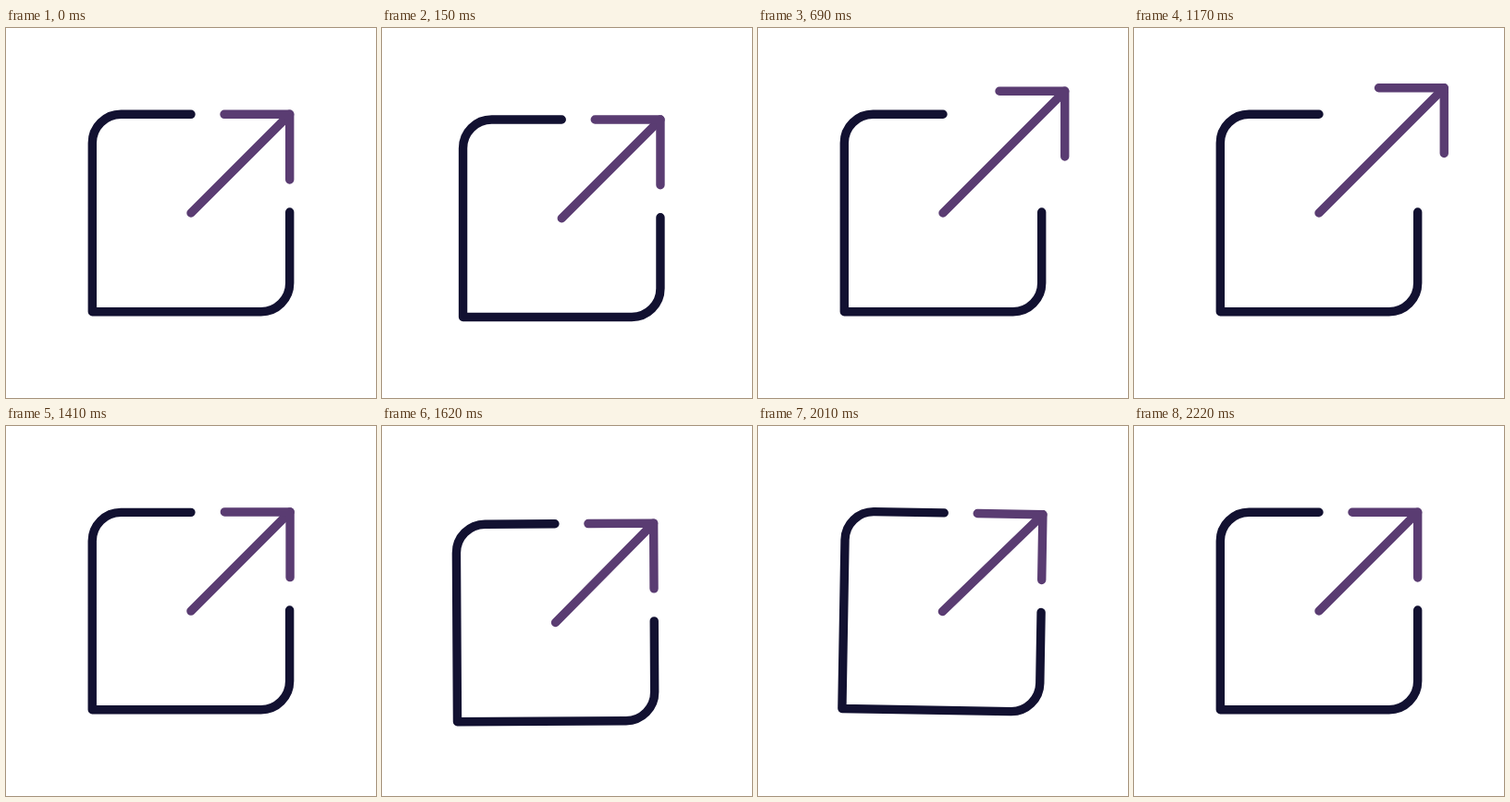
Write an HTML page that moves like this. It is 400 by 400 pixels and loops after 2340 ms.

```html
<!DOCTYPE html>
<html lang="en">
<head>
<meta charset="utf-8">
<title>Open link icon</title>
<style>
  html, body { margin: 0; width: 100%; height: 100%; overflow: hidden; background: #fff; }
  svg { display: block; width: 100%; height: 100%; }
  path { fill: none; stroke-width: 9.4; stroke-linecap: round; stroke-linejoin: round; }
  .box { stroke: #121131; }
  .arrow { stroke: #5a3c72; }
</style>
</head>
<body>
<svg viewBox="0 0 400 400">
  <g id="icon">
    <path class="box" d="M200 93.3H124.3A31 31 0 0 0 93.3 124.3V306.7H275.7A31 31 0 0 0 306.7 275.7V199"/>
    <path class="arrow" id="stem"/>
    <path class="arrow" id="head" d="M236 93.3H306.7V164"/>
  </g>
</svg>
<script>
const LOOP = 2340;
const [icon, stem, head] = ["icon", "stem", "head"].map(id => document.getElementById(id));

const linear = u => u;
const out = u => 1 - (1 - u) ** 2;
const inOut = u => u < .5 ? 2 * u * u : 1 - 2 * (1 - u) ** 2;
const sine = u => (1 - Math.cos(Math.PI * u)) / 2;

// Steps: [time, value, easing towards this value]
const reach = [[0, 0], [190, 0, linear], [397, 32, out], [700, 25, sine], [1090, 32, sine], [1440, 0, inOut]];
const shift = [[0, 0], [110, -8, sine], [225, 0, sine], [1400, 0, linear], [1630, -12.5, sine],
  [1840, 1.6, sine], [2010, -.6, sine], [2200, 0, sine]];
const tilt = [[0, 0], [1400, 0, linear], [1560, 0, linear], [1810, -2.4, sine],
  [1980, 1.2, sine], [2110, -.4, sine], [2220, 0, sine]];

function at(steps, t) {
  const i = steps.findIndex(s => s[0] > t);
  if (i < 0) return steps[steps.length - 1][1];
  const [t0, v0] = steps[i - 1];
  const [t1, v1, ease] = steps[i];
  return v0 + (v1 - v0) * ease((t - t0) / (t1 - t0));
}

function draw() {
  const t = performance.now() % LOOP;
  const r = at(reach, t), s = at(shift, t);
  stem.setAttribute("d", `M200 200L${306.7 + r} ${93.3 - r}`);
  head.setAttribute("transform", `translate(${r} ${-r})`);
  icon.setAttribute("transform", `translate(${s} ${-s}) rotate(${at(tilt, t)} 200 200)`);
  requestAnimationFrame(draw);
}
draw();
</script>
</body>
</html>
```
